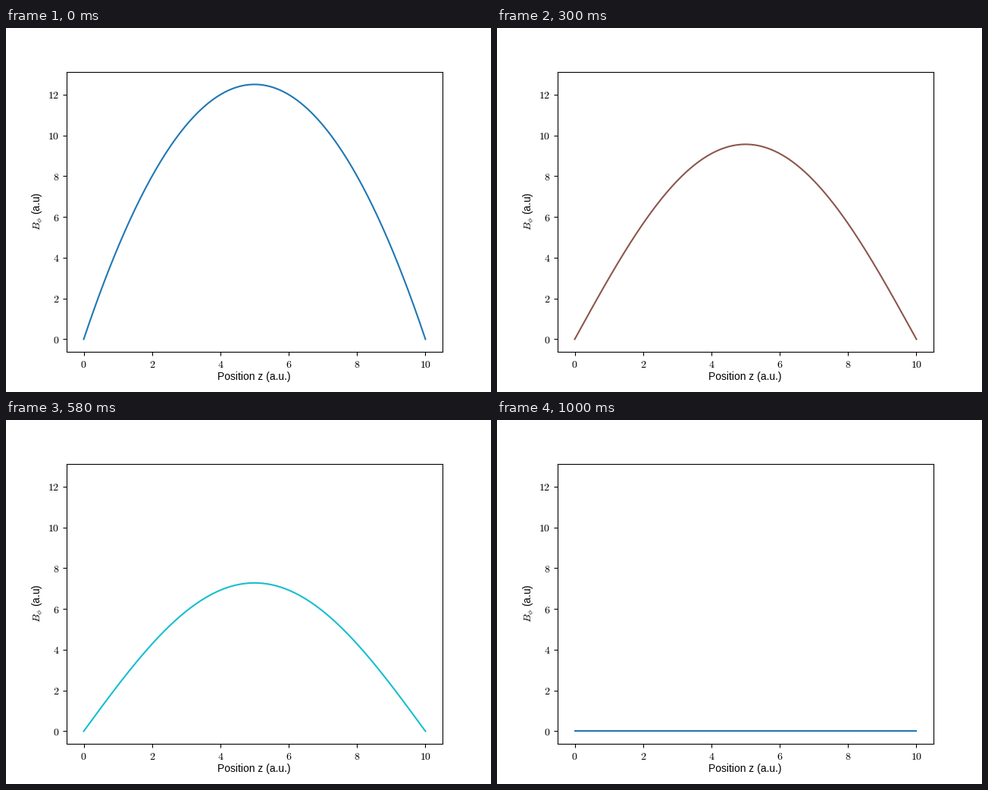
These frames come from a looping animation (640 px wide and 480 px high, 1.02 s). A matplotlib script:

```python
import numpy as np
import matplotlib.pyplot as plt
from matplotlib.animation import FuncAnimation

plt.rcParams.update({
    "font.family": "Liberation Sans",
    "font.size": 10,
    "mathtext.fontset": "cm",
})

W, H, DPI = 640, 480, 100
FRAMES, INTERVAL = 51, 20
LENGTH, DIFF_STEP = 10.0, 0.2

z = np.linspace(0, LENGTH, 201)
wave = np.arange(1, 120, 2)[:, None] * np.pi / LENGTH
modes = 4 / (LENGTH * wave**3) * np.sin(wave * z)


def field(step):
    """Parabola z(L - z)/2 decaying by diffusion with fixed zero ends."""
    if step == FRAMES - 1:
        return np.zeros_like(z)
    return (modes * np.exp(-wave**2 * DIFF_STEP * step)).sum(axis=0)


fig = plt.figure(figsize=(W / DPI, H / DPI), dpi=DPI, facecolor="white")
ax = fig.add_axes([0.125, 0.11, 0.775, 0.77])
ax.set_xlim(-0.5, 10.5)
ax.set_ylim(-0.625, 13.125)
xticks, yticks = range(0, 11, 2), range(0, 13, 2)
ax.set_xticks(xticks, [f"${v}$" for v in xticks])
ax.set_yticks(yticks, [f"${v}$" for v in yticks])

fig.text(327.5 / W, 1 - 464 / H, "Position z (a.u.)", ha="center", va="baseline")
fig.text(46 / W, 1 - 241.5 / H, r"$B_\phi$ (a.u)", rotation=90,
         rotation_mode="anchor", ha="center", va="baseline")

line, = ax.plot(z, field(0), lw=1.5)


def update(step):
    line.set_ydata(field(step))
    line.set_color(f"C{step % 10}")
    return line,


anim = FuncAnimation(fig, update, frames=FRAMES, interval=INTERVAL,
                     repeat=True, repeat_delay=0)
plt.show()
```
